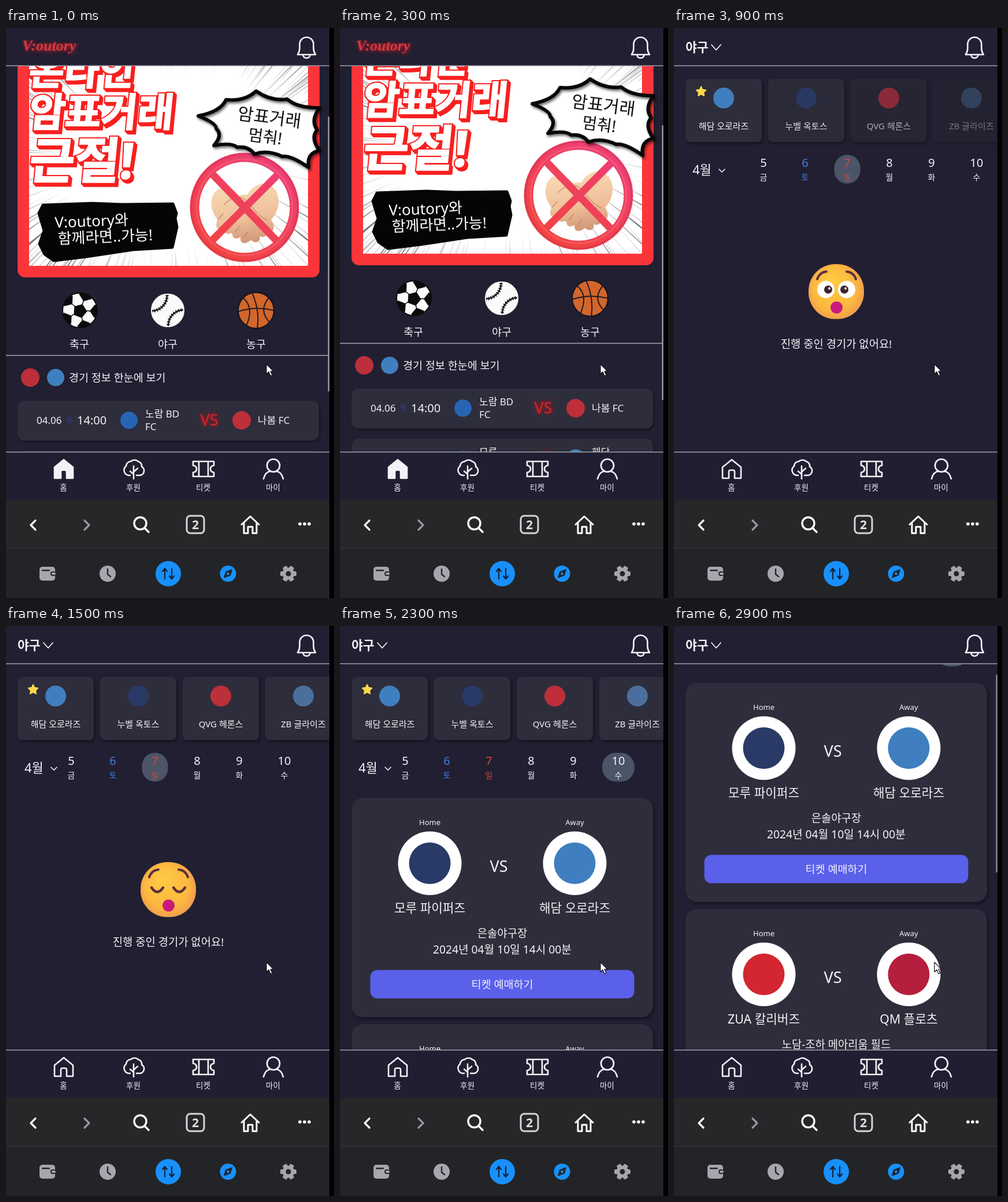
Recreate the animation shown at these times as an HTML page with a canvas. Size 568 by 985 pixels, loop 3 s.

```html
<!DOCTYPE html>
<html lang="ko">
<head>
<meta charset="utf-8">
<title>Ticket app</title>
<style>
html, body { margin: 0; width: 100%; height: 100%; overflow: hidden; background: #000; }
canvas { display: block; width: 568px; height: 985px; }
</style>
</head>
<body>
<canvas id="stage" width="568" height="985"></canvas>
<script>
const c = document.getElementById('stage').getContext('2d');
const FONT = '"Noto Sans", "Noto Sans CJK KR", sans-serif';
const BG = '#211f31', CARD = '#2e2d3b', WHITE = '#f3f3f7';
const BLUE = '#3f7fbf', RED = '#bd2f3a', NAVY = '#293a66', ROYAL = '#2864b4', STEEL = '#4b6f9c';
const DAYS = '금토일월화수', DAY_X = [113, 185, 258, 331, 404, 482];
const TEAMS = [['해담 오로라즈', BLUE], ['누벨 옥토스', NAVY], ['QVG 헤론스', RED], ['ZB 글라이즈', STEEL]];
const clamp = v => Math.max(0, Math.min(1, v));
const smooth = v => (v = clamp(v), v * v * (3 - 2 * v));
const easeOut = v => 1 - (1 - clamp(v)) ** 2;

function text(s, x, y, size, { color = WHITE, weight = 400, align = 'center' } = {}) {
  c.font = `${weight} ${size}px ${FONT}`;
  c.textAlign = align;
  c.fillStyle = color;
  c.fillText(s, x, y + size * 0.36);
}
function rect(x, y, w, h, color, r = 0) {
  c.beginPath(); c.roundRect(x, y, w, h, r);
  c.fillStyle = color; c.fill();
}
function disc(x, y, r, color) {
  c.beginPath(); c.arc(x, y, r, 0, 7);
  c.fillStyle = color; c.fill();
}
function oval(x, y, rx, ry, turn, color) {
  c.beginPath(); c.ellipse(x, y, rx, ry, turn, 0, 7);
  c.fillStyle = color; c.fill();
}
function path(d, x, y, color, width, fill) {
  c.save(); c.translate(x, y);
  const p = new Path2D(d);
  c.lineCap = c.lineJoin = 'round';
  if (fill) { c.fillStyle = fill; c.fill(p); }
  if (width) { c.strokeStyle = color; c.lineWidth = width; c.stroke(p); }
  c.restore();
}
function group(draw, { x = 0, y = 0, turn = 0, clip } = {}) {
  c.save();
  if (clip) { c.beginPath(); c.rect(...clip); c.clip(); }
  c.translate(x, y); c.rotate(turn);
  draw(); c.restore();
}
function shadowed(color, blur, dx, dy, draw) {
  c.save();
  c.shadowColor = color; c.shadowBlur = blur; c.shadowOffsetX = dx; c.shadowOffsetY = dy;
  draw(); c.restore();
}
const panel = (x, y, w, h, r) => shadowed('#15131f', 4, 2, 3, () => rect(x, y, w, h, CARD, r));

// Poster

function speedLines() {
  let seed = 11;
  const rnd = () => (seed = seed * 16807 % 2147483647) / 2147483647;
  for (let i = 0; i < 300; i++) {
    const a = rnd() * Math.PI * 2, w = 0.001 + rnd() * 0.008, k = 0.85 + rnd() * 0.45;
    c.beginPath();
    c.moveTo(285 + Math.cos(a) * 215 * k, 225 + Math.sin(a) * 165 * k);
    c.lineTo(285 + Math.cos(a - w) * 480, 225 + Math.sin(a - w) * 480);
    c.lineTo(285 + Math.cos(a + w) * 480, 225 + Math.sin(a + w) * 480);
    c.fillStyle = `rgba(50,50,55,${0.2 + rnd() * 0.45})`;
    c.fill();
  }
}
function headline(s, y, size) {
  c.save();
  c.transform(1, 0, -0.1, 1, 38, y);
  c.font = `900 ${size}px ${FONT}`;
  c.textAlign = 'left'; c.lineJoin = 'miter'; c.miterLimit = 2;
  c.strokeStyle = '#f8201f'; c.lineWidth = 6;
  for (let k = 5; k >= 0; k--) c.strokeText(s, k, k);
  c.strokeStyle = c.fillStyle = '#fff'; c.lineWidth = 2;
  c.strokeText(s, 0, 0); c.fillText(s, 0, 0);
  c.restore();
}
function burst() {
  const tips = [[333, 152], [381, 124], [433, 109], [487, 123], [543, 138], [539, 176],
    [543, 212], [524, 241], [478, 222], [430, 218], [400, 206], [360, 203], [364, 174]];
  c.beginPath();
  c.moveTo(...tips[0]);
  tips.forEach(([x, y], i) => {
    const [u, v] = tips[(i + 1) % tips.length];
    const mx = (x + u) / 2, my = (y + v) / 2;
    c.quadraticCurveTo(mx + (450 - mx) * 0.16, my + (170 - my) * 0.2, u, v);
  });
  c.closePath();
  c.fillStyle = '#fff'; c.strokeStyle = '#080808'; c.lineWidth = 6; c.lineJoin = 'round';
  c.fill();
  shadowed('#0009', 4, 2, 3, () => c.stroke());
  group(() => {
    text('암표거래', 0, -17, 30, { color: '#111', weight: 500 });
    text('멈춰!', -3, 17, 28, { color: '#111', weight: 500 });
  }, { x: 454, y: 171, turn: 0.13 });
}
function handshake() {
  const skin = c.createLinearGradient(400, 265, 420, 372);
  skin.addColorStop(0, '#f9dcb6'); skin.addColorStop(0.6, '#efc09a'); skin.addColorStop(1, '#cf9676');
  oval(384, 309, 27, 35, -0.4, skin);
  oval(442, 305, 29, 37, 0.35, skin);
  oval(413, 324, 44, 36, 0, skin);
  for (let i = 0; i < 4; i++) oval(377 + i * 14, 333 + i * 8, 10, 17, 0.65, skin);
  for (let i = 0; i < 3; i++) oval(451 - i * 12, 337 + i * 9, 10, 17, -0.6, skin);
  path('M378 305Q402 281 420 302Q438 326 452 332M367 331l9-10M381 343l9-10M397 352l8-10M412 361l7-9', 0, 0, '#b57c5a88', 2);
}
function banSign() {
  handshake();
  const g = c.createLinearGradient(350, 385, 450, 225);
  g.addColorStop(0, '#f2433f'); g.addColorStop(1, '#ee3f74');
  path('M357 252L470 369M473 251L354 370', 0, 0, g, 13);
  c.beginPath(); c.arc(413, 310, 86.5, 0, 7);
  c.strokeStyle = g; c.lineWidth = 16; c.stroke();
  for (const [r, shade] of [[92, '#c22f4f66'], [83, '#ff8f9a44']]) {
    c.beginPath(); c.arc(413, 310, r, 0, 7);
    c.strokeStyle = shade; c.lineWidth = 3; c.stroke();
  }
}
function poster() {
  rect(20, -90, 523, 521, '#fb3539', 13);
  rect(40, -70, 483, 481, '#fff');
  group(speedLines, { clip: [40, 0, 483, 411] });
  headline('온라인', 98, 66);
  headline('암표거래', 170, 68);
  headline('근절!', 260, 85);
  path('M64 306L150 303 200 305 289 304 295 320 293 329 296 344 288 379 220 383 140 395 83 402 67 391 58 373 66 350 57 320Z', 0, 0, '#050505', 5, '#050505');
  group(() => {
    text('V:outory와', 0, -15, 26, { color: '#fff', align: 'left' });
    text('함께라면..가능!', 4, 13, 26, { color: '#fff', align: 'left' });
  }, { x: 85, y: 351, turn: -0.04 });
  banSign();
  burst();
}

// Sport buttons

function ball(x, y, r, fill, edge, draw) {
  c.save();
  disc(x, y, r, fill);
  c.clip(); c.translate(x, y); draw();
  c.restore();
  c.beginPath(); c.arc(x, y, r, 0, 7);
  c.strokeStyle = edge; c.lineWidth = 2; c.stroke();
}
function pentagon(x, y, r, turn) {
  c.beginPath();
  for (let i = 0; i < 5; i++) {
    const a = turn + i * Math.PI * 0.4;
    c.lineTo(x + Math.cos(a) * r, y + Math.sin(a) * r);
  }
  c.closePath(); c.fillStyle = '#0b0b0e'; c.fill();
}
function sports() {
  ball(128, 488, 30, '#fafafa', '#0b0b0e', () => {
    pentagon(0, 1, 12.5, -1.2);
    for (let i = 0; i < 5; i++) {
      const a = -1.2 + i * Math.PI * 0.4, x = Math.cos(a), y = Math.sin(a);
      path(`M${x * 11} ${y * 11}L${x * 21} ${y * 21}`, 0, 0, '#0b0b0e', 1.5);
      pentagon(x * 29, y * 29, 12, a + Math.PI);
    }
  });
  ball(280, 488, 28, '#fafafa', '#fafafa', () => {
    for (const side of [-1, 1]) {
      c.beginPath(); c.arc(side * 28, side * 26, 27, 0, 7);
      c.strokeStyle = '#16151d'; c.lineWidth = 2.4; c.stroke();
      c.setLineDash([1.5, 3]); c.lineWidth = 6; c.stroke(); c.setLineDash([]);
    }
  });
  ball(433, 488, 31, '#d2662b', '#15131d', () =>
    path('M-7-31Q7 0 2 32M-31 2Q0-8 31 0M-24-23Q-2-6 -17 27M24-24Q2 0 25 22', 0, 0, '#241a25', 2));
  ['축구', '야구', '농구'].forEach((s, i) => text(s, 127 + i * 153, 546, 18.5));
}

// Pages

function fixture(y, home, away, homeColor, awayColor) {
  const left = { align: 'left' };
  panel(20, y, 522, 69, 12);
  text('04.06', 53, y + 34, 17, left);
  text('토', 110, y + 34, 12, { color: '#2447a8' });
  text('14:00', 123, y + 34, 20, left);
  disc(213, y + 34, 15, homeColor);
  home.forEach((s, i) => text(s, 241, y + 23 + i * 22, 17, left));
  shadowed('#f00', 7, 0, 0, () => text('VS', 352, y + 33, 27, { color: '#cf2730', weight: 500 }));
  disc(408, y + 34, 16, awayColor);
  away.forEach((s, i) => text(s, 436, y + (away.length > 1 ? 23 : 34) + i * 22, 17, left));
}
function homePage(scroll) {
  group(() => {
    poster();
    sports();
    rect(0, 565, 560, 1.5, '#a5a4b0');
    disc(42, 604, 16, RED);
    disc(86, 604, 15, BLUE);
    text('경기 정보 한눈에 보기', 109, 604, 18.5, { align: 'left' });
    fixture(644, ['노람 BD', 'FC'], ['나봄 FC'], ROYAL, RED);
    fixture(731, ['모루', '파이퍼즈'], ['해담', '오로라즈'], NAVY, BLUE);
  }, { y: -scroll, clip: [0, 66, 560, 666] });
  rect(557.5, 153 + scroll * 0.71, 2.5, 475, '#9795a3', 1);
}
function monthPicker(y) {
  text('4월', 32, y, 22, { align: 'left' });
  path('M-5-2L0 3L5-2', 83, y + 1, WHITE, 1.6);
}
function teamCards(t) {
  TEAMS.forEach(([name, color], i) => {
    const x = 20 + i * 143;
    c.globalAlpha = clamp((t - 610 - i * 63) / 250);
    panel(x, 88, 132, 109, 8);
    disc(x + 66, 121, 18, color);
    text(name, x + 66, 170, 15);
  });
  c.globalAlpha = 1;
  let star = '';
  for (let i = 0; i < 10; i++) {
    const a = -Math.PI / 2 + i * Math.PI / 5, r = i % 2 ? 4.6 : 9;
    star += `${i ? 'L' : 'M'}${Math.cos(a) * r} ${Math.sin(a) * r}`;
  }
  path(star + 'Z', 47, 110, '#fbd84b', 1.5, '#fbd84b');
}
function dateStrip(shift, picked) {
  const w = picked === 5 ? 56 : 45;
  rect(DAY_X[picked] + shift - w / 2, 219, w, 50, '#4c5467', 24);
  DAY_X.forEach((x, i) => {
    const color = i === 1 ? '#477de0' : i === 2 ? '#d0493f' : WHITE;
    text(5 + i, x + shift, 233, 20, { color });
    text(DAYS[i], x + shift, 258, 14, { color });
  });
}
function emoji(open) {
  const g = c.createRadialGradient(270, 435, 5, 281, 456, 52);
  g.addColorStop(0, '#ffc944'); g.addColorStop(0.7, '#fcb83f'); g.addColorStop(1, '#ee9750');
  rect(233, 408, 96, 95, g, 46);
  const brown = '#5a3040';
  path('M248 434Q252 422 264 421M299 421Q311 422 315 434', 0, 0, brown, 4);
  if (open > 0) {
    for (const [x, look] of [[263, 4], [299, -4]]) {
      oval(x, 452, 15, 15 * open, 0, '#fff');
      oval(x + look, 452, 7, 7 * open, 0, '#3f2430');
      oval(x + look + 2, 450, 2, 2 * open, 0, '#fff');
    }
  } else {
    path('M252 452Q262 467 272 452M290 452Q300 467 310 452', 0, 0, brown, 4.5);
  }
  disc(281.5, 483, 10.5, '#c9197f');
}
function match(y, home, away, place) {
  panel(20, y, 522, 379, 20);
  [['Home', 155.5, home], ['Away', 406.5, away]].forEach(([label, x, [name, color]]) => {
    text(label, x, y + 42, 13, { weight: 500 });
    disc(x, y + 113, 55, '#fff');
    disc(x, y + 113, 36, color);
    text(name, x, y + 190, 21.3);
  });
  text('VS', 275, y + 118, 27);
  text(place, 281, y + 234, 18.8);
  text('2024년 04월 10일 14시 00분', 281, y + 262, 19.2);
  rect(52.5, y + 297.5, 457, 49, '#5a60ea', 12);
  text('티켓 예매하기', 281, y + 322, 18.5);
}
function baseballPage(t) {
  const empty = '진행 중인 경기가 없어요!';
  if (t < 700) {
    monthPicker(135);
    text(empty, 281, 436, 18.8);
    return;
  }
  const scroll = 199 * smooth((t - 2400) / 500);
  group(() => {
    teamCards(t);
    monthPicker(245);
    dateStrip(42 * (1 - smooth((t - 950) / 500)), t < 1900 ? 2 : 5);
    if (t < 2000) {
      emoji(clamp((1350 - t) / 150) + clamp((t - 1700) / 150));
      text(empty, 281, 546, 18.8);
    } else {
      match(297, ['모루 파이퍼즈', NAVY], TEAMS[0], '은솔야구장');
      match(688, ['ZUA 칼리버즈', '#d32630'], ['QM 플로츠', '#b51f3d'], '노담-조하 메아리움 필드');
    }
  }, { y: -scroll, clip: [0, 66, 560, 666] });
  if (scroll) rect(557.5, 66 + scroll * 0.09, 2.5, 342, '#8b8997', 1);
}

// Fixed bars

function header(home) {
  rect(0, 0, 560, 66, BG);
  rect(0, 64.5, 560, 1.5, '#a09fab');
  if (home) shadowed('#f01d2a', 6, 1, 1, () => {
    c.font = 'italic 700 26px "Liberation Serif", serif';
    c.textAlign = 'left'; c.fillStyle = '#d33a42';
    c.fillText('V:outory', 28, 39);
  });
  else {
    text('야구', 20, 33, 21.5, { weight: 600, align: 'left' });
    path('M-8-4L0 5L8-4', 73, 33, WHITE, 1.8);
  }
  path('M-15.5 13H15.5Q12 8 12 2V-5A12 12 0 0 0-12-5V2Q-12 8-15.5 13ZM-6 14A6 5 0 0 0 6 14', 520.5, 33, WHITE, 2.6);
}
function tabBar(home) {
  rect(0, 732, 560, 84, '#201e30');
  rect(0, 732, 560, 1.5, '#a09fab');
  path('M-16-3L0-16L16-3V16H5V5Q5 2 2 2H-2Q-5 2-5 5V16H-16Z', 100, 762, WHITE, 2.6, home ? WHITE : '');
  path('M0 17V-5M0 5L7-1M0 9L-6 4M-6 11H-9A9 9 0 0 1-13-5A8 8 0 0 1-5-13A9 8 0 0 1 8-13A8 8 0 0 1 14-4A8 8 0 0 1 10 11H5', 221, 762, WHITE, 2.6);
  path('M-18-13H18V-6A6 6 0 0 0 18 6V13H-18V6A6 6 0 0 0-18-6ZM-8-12V12M8-12V12', 342, 762, WHITE, 2.7);
  path('M-11-6A11 11 0 1 0 11-6A11 11 0 1 0-11-6M-17 17Q-14 5-5 4M17 17Q14 5 5 4', 463, 762, WHITE, 2.7);
  ['홈', '후원', '티켓', '마이'].forEach((s, i) => text(s, 99.5 + i * 121, 794, 13.5));
}
function browserBars() {
  rect(0, 816, 560, 82, '#262729');
  rect(0, 898, 560, 87, '#232427');
  rect(0, 898, 560, 1.5, '#323337');
  path('M4-8L-4 0L4 8', 47, 859, '#fff', 3.2);
  path('M-4-8L4 0L-4 8', 140, 859, '#98989c', 3.2);
  path('M-12-2A10.5 10.5 0 1 0 9-2A10.5 10.5 0 1 0-12-2M6 6L13 13', 234, 858, '#fff', 3.4);
  c.beginPath(); c.roundRect(313, 843, 30, 30, 6);
  c.strokeStyle = '#d6d6d9'; c.lineWidth = 3; c.stroke();
  text('2', 328, 858, 21, { color: '#e0e0e3', weight: 600 });
  path('M-15 0L0-14L15 0M-11-3V15H-4V4H4V15H11V-3', 423, 858, '#fff', 3);
  for (const x of [509, 517, 525]) disc(x, 857, 2.8, '#fff');

  const gray = '#a6a6af', dark = '#232427';
  rect(58, 931, 27, 24, gray, 5);
  rect(62, 936, 14, 2.5, dark, 1);
  rect(77, 939, 9, 8, dark, 4);
  rect(79, 941, 7, 4, gray, 2);
  disc(176, 943, 14, gray);
  path('M0-8V1L5 5', 176, 943, dark, 2.4);
  disc(281, 943, 22, '#1890fb');
  path('M-6 9V-9L-10-4M-6-9L-2-4M6-9V9L2 4M6 9L10 4', 281, 943, '#152238', 2.2);
  disc(384.5, 943, 14, '#1890fb');
  path('M7-7L4 3L-7 7L-4-3Z', 384.5, 943, dark, 1, dark);
  disc(384.5, 943, 2.2, '#1890fb');
  for (let i = 0; i < 6; i++)
    group(() => rect(-4, -14, 8, 10, gray, 2), { x: 489, y: 943, turn: i * Math.PI / 3 + Math.PI / 6 });
  disc(489, 943, 10.5, gray);
  disc(489, 943, 4.5, dark);
}

function render(t) {
  const home = t < 600;
  rect(0, 0, 568, 985, '#000');
  rect(0, 0, 560, 985, BG);
  if (home) homePage(21 * easeOut(t / 300));
  else baseballPage(t);
  header(home);
  tabBar(home);
  browserBars();
  path('M0 0V17L4 13L7 20L10 19L7 12H12Z', 451, 581, '#15151c', 1.2, '#fff');
}
function tick(now) {
  render(Math.floor(now % 3000 / 100) * 100);
  requestAnimationFrame(tick);
}
render(0);
requestAnimationFrame(tick);
</script>
</body>
</html>
```
